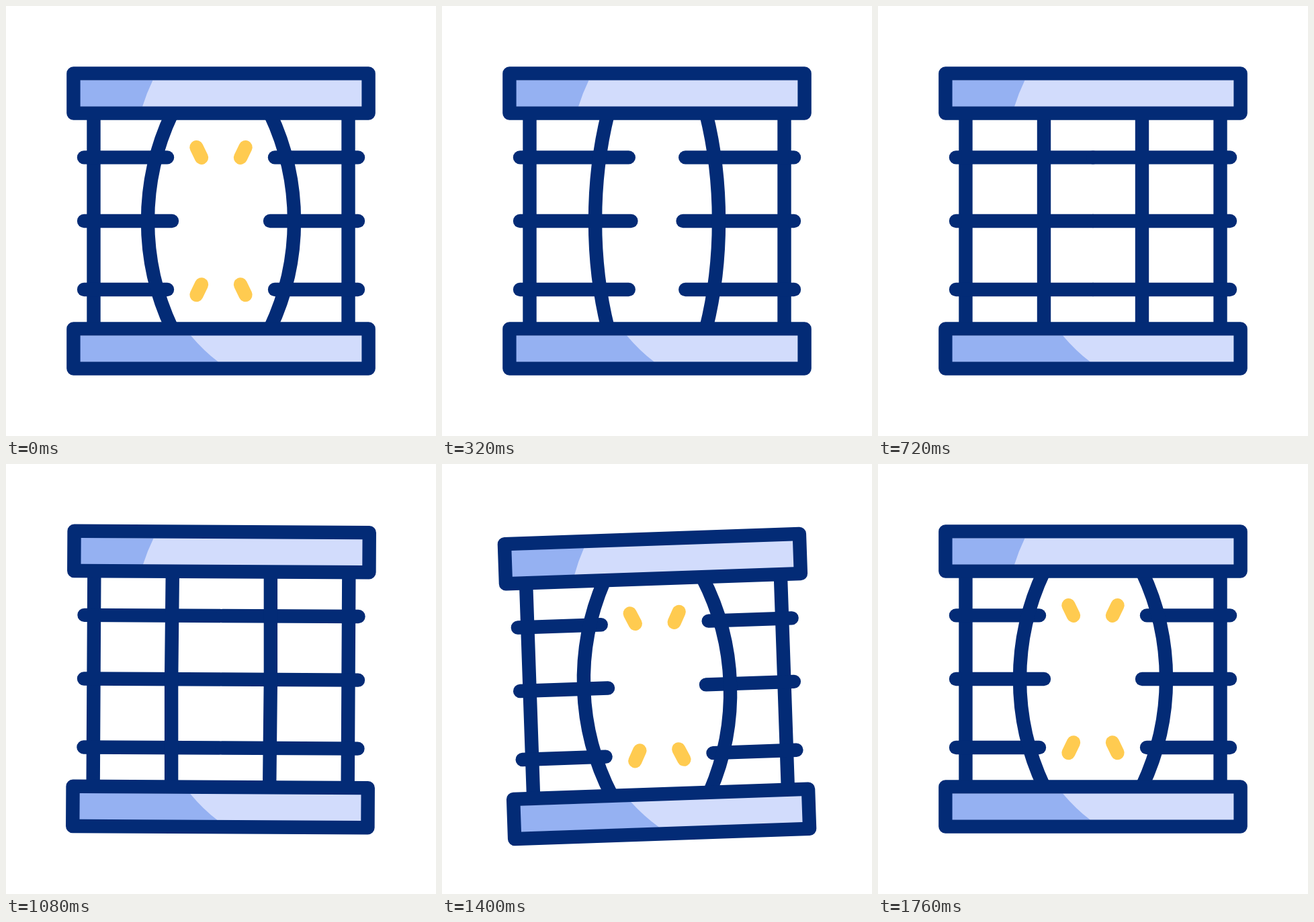
Write an HTML page with a canvas that moves like this. It is 640 px wide and 640 px high and loops after 1800 ms.

```html
<!DOCTYPE html>
<html lang="en">
<head>
<meta charset="utf-8">
<title>Bent bars</title>
<style>
  html, body { margin: 0; width: 100%; height: 100%; overflow: hidden; background: #fff; }
  canvas { display: block; width: 100vmin; height: 100vmin; }
</style>
</head>
<body>
<canvas id="stage" width="640" height="640"></canvas>
<script>
const ctx = document.getElementById('stage').getContext('2d');
const LOOP = 1800;
const NAVY = '#032b76', PALE = '#d2dcfc', BLUE = '#95b1f2', YELLOW = '#ffcb50';

// Keyframes as [time, value], eased in and out between neighbours
const GAP = [[0, 1], [667, 0], [1060, 0], [1285, 1]];
const SPARK = [[0, 1], [230, 0], [1205, 0], [1400, 1]];
const TILT = [[1040, 0], [1206, 2], [1397, -2], [1535, 2], [1668, 0]];
const DROP = [[1062, 0], [1240, 17], [1640, 0]];

function at(keys, t) {
  if (t <= keys[0][0]) return keys[0][1];
  for (let i = 1; i < keys.length; i++) {
    const [t0, a] = keys[i - 1], [t1, b] = keys[i];
    if (t < t1) {
      const u = (t - t0) / (t1 - t0);
      return a + (b - a) * u * u * (3 - 2 * u);
    }
  }
  return keys[keys.length - 1][1];
}

function line(x0, y0, x1, y1) {
  ctx.beginPath();
  ctx.moveTo(x0, y0);
  ctx.lineTo(x1, y1);
  ctx.stroke();
}

function plate(y, x0, cx, cy, x1) {
  ctx.fillStyle = PALE;
  ctx.fillRect(100.4, y, 439.2, 59.2);
  ctx.fillStyle = BLUE;
  ctx.beginPath();
  ctx.moveTo(105, y + 10);
  ctx.lineTo(x0, y + 10);
  ctx.quadraticCurveTo(cx, cy, x1, y + 49.4);
  ctx.lineTo(105, y + 49.4);
  ctx.fill();
  ctx.strokeRect(100.4, y, 439.2, 59.2);
}

// Left half of the grille; x runs from the centre outwards to the left
function half(gap, spark) {
  line(-189.5, 160, -189.5, 480);
  line(-204, 225.4, -80 * gap, 225.4);
  line(-204, 320, -73 * gap, 320);
  line(-204, 422, -80 * gap, 422);

  const near = -73 - 23.7 * gap, far = -73 - 36 * gap;
  ctx.beginPath();
  ctx.moveTo(-73, 160);
  ctx.bezierCurveTo(near, 210, far, 264.7, far, 320);
  ctx.bezierCurveTo(far, 375.3, near, 430, -73, 480);
  ctx.stroke();

  if (spark > 0) {
    ctx.strokeStyle = YELLOW;
    const dx = 7.5 * spark, dy = 15.5 * spark;
    line(-29, 225.7, -29 - dx, 225.7 - dy);
    line(-29, 414.5, -29 - dx, 414.5 + dy);
    ctx.strokeStyle = NAVY;
  }
}

function draw(t) {
  ctx.setTransform(1, 0, 0, 1, 0, 0);
  ctx.fillStyle = '#fff';
  ctx.fillRect(0, 0, 640, 640);

  ctx.translate(320, 320 + at(DROP, t));
  ctx.rotate(at(TILT, t) * Math.PI / 180);
  ctx.translate(-320, -320);
  ctx.strokeStyle = NAVY;
  ctx.lineWidth = 20.4;
  ctx.lineCap = ctx.lineJoin = 'round';

  const gap = at(GAP, t), spark = at(SPARK, t);
  for (const side of [1, -1]) {
    ctx.save();
    ctx.translate(320, 0);
    ctx.scale(side, 1);
    half(gap, spark);
    ctx.restore();
  }
  plate(100.4, 218.5, 209, 130, 203);
  plate(480.4, 275, 294, 513, 316);
}

const start = performance.now();
function tick() {
  draw((performance.now() - start) % LOOP);
  requestAnimationFrame(tick);
}
tick();
</script>
</body>
</html>
```
